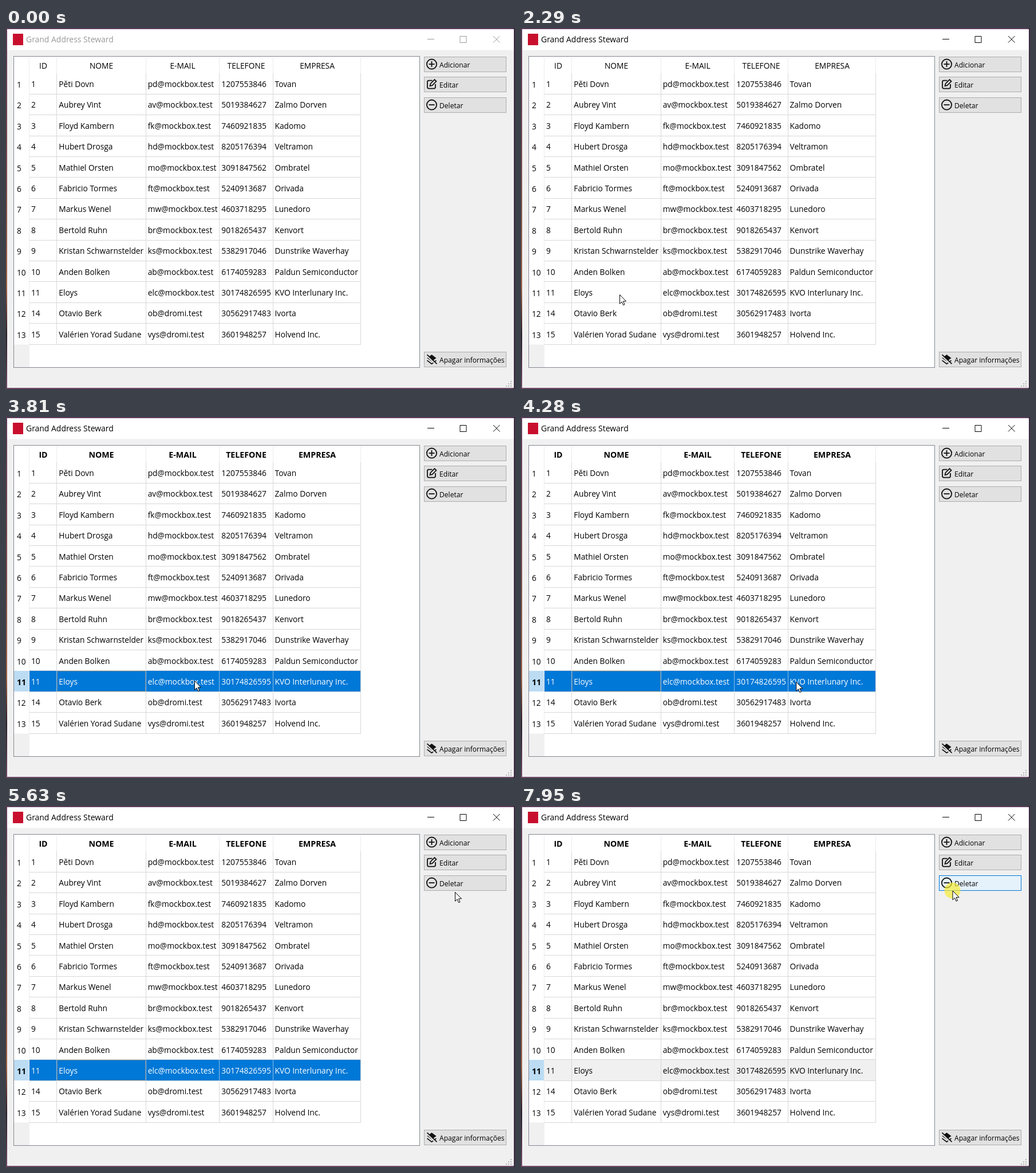
Write an HTML page that moves like this. It is 889 by 630 pixels and loops after 8 s.

```html
<!DOCTYPE html>
<html lang="pt">
<head>
<meta charset="utf-8">
<title>Contatos</title>
<style>
  html, body { margin: 0; width: 100%; height: 100%; overflow: hidden; }
  svg { display: block; width: 100vw; height: 100vh; }
  text { font: 13.75px "Open Sans", "Noto Sans", sans-serif; white-space: pre; }
  .head { text-anchor: middle; }
  .title { font-size: 13.95px; fill: #999; }
  .btn { font-size: 12.1px; }
  .tip { fill: #575757; }
  .chrome { fill: none; stroke: #999; }
  .active .title { fill: #000; }
  .active .chrome { stroke: #000; }
  .pick { visibility: hidden; }
  .chosen .pick { visibility: visible; }
  .chosen .head, .chosen .num.current { font-weight: 700; font-size: 14.2px; }
  .bar { fill: #0078d7; }
  .seam { stroke: #8fbfe8; }
  .chosen .cell.current { fill: #fff; }
  .blurred .bar { fill: #f0f0f0; }
  .blurred .seam { stroke: #d8d8d8; }
  .blurred .cell.current { fill: #000; }
  .chosen.blurred .focus { visibility: hidden; }
</style>
</head>
<body>
<svg id="stage" viewBox="0 0 889 630" preserveAspectRatio="none"></svg>
<script>
const LOOP = 8000, ROW = 36.4, TOP = 79, CURRENT = 10;
const edges = [40.5, 88.5, 244.5, 372.5, 466.5, 619.5];
const textX = [44, 92.3, 247.7, 376.3, 469.5];
const heads = [['ID', 65], ['NOME', 166.5], ['E-MAIL', 308.5], ['TELEFONE', 419.5], ['EMPRESA', 543.5]];
const people = `Pěti Dovn|pd@mockbox.test|1207553846|Tovan
Aubrey Vint|av@mockbox.test|5019384627|Zalmo Dorven
Floyd Kambern|fk@mockbox.test|7460921835|Kadomo
Hubert Drosga|hd@mockbox.test|8205176394|Veltramon
Mathiel Orsten|mo@mockbox.test|3091847562|Ombratel
Fabricio Tormes|ft@mockbox.test|5240913687|Orivada
Markus Wenel|mw@mockbox.test|4603718295|Lunedoro
Bertold Ruhn|br@mockbox.test|9018265437|Kenvort
Kristan Schwarnstelder|ks@mockbox.test|5382917046|Dunstrike Waverhay
Anden Bolken|ab@mockbox.test|6174059283|Paldun Semiconductor
Eloys|elc@mockbox.test|30174826595|KVO Interlunary Inc.
Otavio Berk|ob@dromi.test|30562917483|Ivorta
Valérien Yorad Sudane|vys@dromi.test|3601948257|Holvend Inc.`.split('\n').map(r => r.split('|'));

const text = (x, y, s, cls = '') => `<text x="${x}" y="${y}" class="${cls}">${s}</text>`;
const rect = (x, y, w, h, fill, more = '') =>
  `<rect x="${x}" y="${y}" width="${w}" height="${h}" fill="${fill}" ${more}/>`;
const line = (d, color, cls = '') => `<path d="${d}" fill="none" stroke="${color}" class="${cls}"/>`;
const rowY = i => TOP + ROW * i;
const gridY = i => Math.round(rowY(i) - .6) + .5;

function frame() {
  let grip = '';
  for (let i = 0; i < 3; i++)
    for (let j = 0; j <= i; j++) grip += rect(881 - 4 * j, 616 + 4 * i, 2, 2, '#b5b5b5');
  return `<defs><linearGradient id="desk" x2="0" y2="1">
      <stop stop-color="#5d3c5c"/><stop offset=".45" stop-color="#7d4d4a"/>
      <stop offset=".72" stop-color="#a06046"/><stop offset=".85" stop-color="#2c1c28"/>
      <stop offset="1" stop-color="#6d4a66"/></linearGradient></defs>` +
    rect(0, 0, 889, 630, 'url(#desk)') + rect(886, 0, 3, 630, '#3c2a40') +
    rect(2, 2, 885, 626, '#f0f0f0') + rect(2, 2, 885, 36.5, '#fff') +
    rect(12, 10, 18, 20, '#c8102e') + text(35, 25.3, 'Grand Address Steward', 'title') +
    `<path class="chrome" d="M736 19.5h12M793 14.5h11v11h-11zM851 14l11.5 11.5M862.5 14L851 25.5"/>` + grip;
}

function table() {
  const last = gridY(people.length), y = gridY(CURRENT) + .5, h = gridY(CURRENT + 1) - y - .5;
  let s = rect(13.5, 49.5, 709, 543, '#fff', 'stroke="#828790"') +
    rect(14, last, 27, 592 - last, '#f0f0f0') +
    rect(14, y, 26.5, h, '#bcdcf4', 'class="pick"');
  edges.forEach((x, i) => {
    s += line(`M${x} 51V${TOP}`, '#ececec') + line(`M${x} ${TOP}V${last}`, i ? '#d8d8d8' : '#ececec');
  });
  people.forEach((p, i) => s += line(`M41 ${gridY(i + 1)}H619.5`, '#d8d8d8'));
  s += rect(41, y, 578, h, '#0078d7', 'class="pick bar"') +
    edges.slice(1, 5).map(x => line(`M${x} ${y}v${h}`, '#fff', 'pick seam')).join('') +
    rect(89.5, y + .5, 154, h - 1, 'none', 'class="pick focus" stroke="#b9884f" stroke-dasharray="1 1"');
  people.forEach((p, i) => {
    const cur = i === CURRENT ? ' current' : '', id = i < 11 ? i + 1 : i + 3;
    s += text(19, rowY(i) + 25, i + 1, 'num' + cur);
    [id, ...p].forEach((v, c) => s += text(textX[c], rowY(i) + 24, v, 'cell' + cur));
  });
  return s + heads.map(([h, x]) => text(x, 70.5, h, 'head')).join('');
}

// Icons are drawn around their own centre.
const ring = '<circle r="8.6"/>';
const icons = {
  add: ring + '<path d="M-5 0H5M0-5V5"/>',
  edit: '<path d="M1-6.5H-5Q-7.5-6.5-7.5-4V5Q-7.5 7.5-5 7.5H4Q6.5 7.5 6.5 5V0M-3 3L-2-1L5-8L8-5L1 2Z"/>',
  remove: ring + '<path d="M-5 0H5"/>',
  clear: '<path d="M-8-2L0-8L8-2L0 4Z" fill="#111" stroke="none"/><path d="M-8 2L0 8L8 2"/>' +
    '<path d="M-9-7L8 9" stroke="#e1e1e1" stroke-width="3"/><path d="M-8-8L9 8"/>'
};
const buttons = [['add', 'Adicionar', 50.5], ['edit', 'Editar', 85.5], ['remove', 'Deletar', 121.5], ['clear', 'Apagar informações', 565.5]];

function side() {
  let s = '';
  for (const [icon, label, y] of buttons) {
    s += rect(730.5, y, 143, 26, '#e1e1e1', 'stroke="#adadad"');
    if (icon === 'remove') s += rect(730.5, y, 143, 26, '#e5f1fb', 'id="hover" stroke="#0078d7"');
    s += `<g transform="translate(743.5 ${y + 12.6})" fill="none" stroke="#111" stroke-width="1.8">${icons[icon]}</g>` +
      text(757, y + 18, label, 'btn');
  }
  return s;
}

const overlay = '<g id="tip">' + rect(759, 167, 140, 24, '#000', 'opacity=".22"') +
  rect(755.5, 163.5, 190, 24, '#fff', 'stroke="#767676"') +
  text(761.5, 181, 'Apagar contato selecionado', 'tip') + '</g>' +
  '<circle id="click" r="14" fill="#f8ec30" opacity=".68"/>' +
  '<path id="cursor" d="M.5.5V16.3L4.1 12.8L6.6 18.6L9 17.6L6.5 11.9H11.6Z" fill="#fff" stroke="#000"/>';

const stage = document.getElementById('stage');
stage.innerHTML = frame() + table() + side() + overlay;
const [hover, tip, click, cursor] = ['hover', 'tip', 'click', 'cursor'].map(id => document.getElementById(id));

// Pointer keys: time, x, y
const keys = [
  [600, 637, 569], [700, 596, 516], [840, 596, 516], [1010, 681, 486], [1410, 681, 486],
  [1530, 664, 482], [1640, 664, 482], [1980, 370, 430], [2290, 172, 465], [3290, 172, 465],
  [3340, 175, 465], [3800, 325, 460], [4130, 447, 461], [4280, 480, 462], [4970, 774, 364],
  [5630, 784, 150], [5810, 774, 141], [6150, 753.5, 147.5], [LOOP, 753.5, 147.5]
];
const slope = (i, c) => (keys[i + 1][c] - keys[i][c]) / (keys[i + 1][0] - keys[i][0]);

// Monotone tangent: flat at turns and rests.
function tangent(i, c) {
  if (i === 0 || i === keys.length - 1) return 0;
  const a = slope(i - 1, c), b = slope(i, c);
  return a * b > 0 ? 2 * a * b / (a + b) : 0;
}

function pointer(t, c) {
  let i = 0;
  while (i < keys.length - 2 && t >= keys[i + 1][0]) i++;
  const p = keys[i], q = keys[i + 1], d = q[0] - p[0];
  const u = Math.max(0, (t - p[0]) / d), v = 1 - u;
  return p[c] * v * v * (1 + 2 * u) + q[c] * u * u * (3 - 2 * u) +
    d * u * v * (tangent(i, c) * v - tangent(i + 1, c) * u);
}

const ramp = (t, from, length) => Math.min(1, Math.max(0, (t - from) / length));
const show = (el, on) => el.setAttribute('visibility', on ? 'visible' : 'hidden');

function draw(now) {
  const t = now % LOOP;
  stage.classList.toggle('active', t >= 1160);
  stage.classList.toggle('chosen', t >= 2750);
  stage.classList.toggle('blurred', t >= 7950);
  hover.style.opacity = ramp(t, 5660, 250);
  tip.style.opacity = t < 6880 || t >= 7950 ? 0 : t < 6930 ? .5 : 1;
  const at = `translate(${pointer(t, 1)} ${pointer(t, 2)})`;
  cursor.setAttribute('transform', at);
  click.setAttribute('transform', at);
  show(cursor, t >= 600);
  show(click, t >= 1160 && t < 1280 || t >= 2750 && t < 2830 || t >= 7950);
  requestAnimationFrame(draw);
}
draw(performance.now());
</script>
</body>
</html>
```
